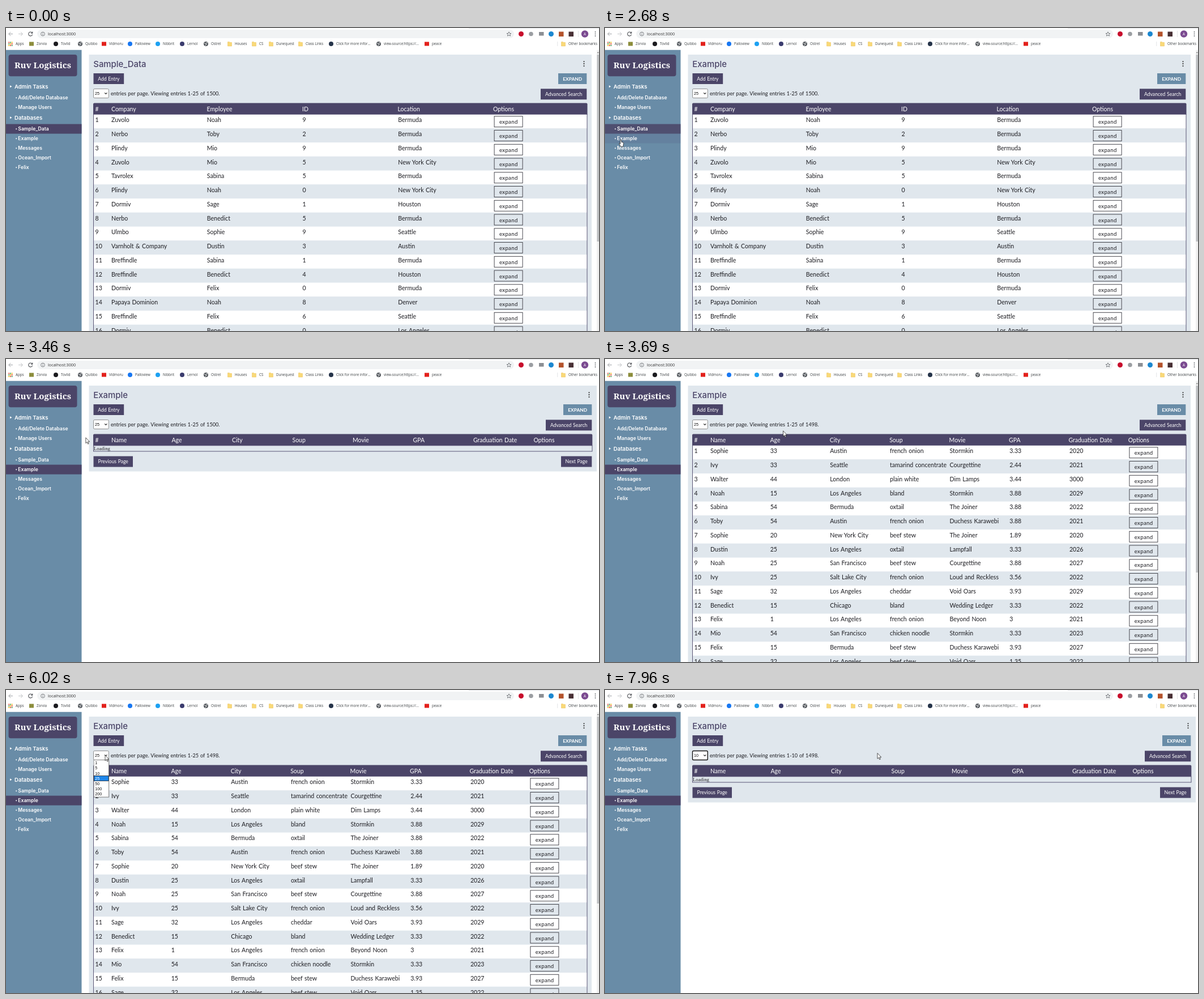
Animation, 1047 px wide and 535 px high, one loop 8 s. Source, as an HTML page:

```html
<!DOCTYPE html>
<html lang="en">
<head>
<meta charset="utf-8">
<title>Database dashboard</title>
<style>
html, body { margin: 0; width: 100%; height: 100%; overflow: hidden; background: #fff; }
svg { display: block; width: 100vw; height: 100vh; }
text { white-space: pre; }
.bar { font: 6.2px "Open Sans", sans-serif; fill: #3c4043; }
.url { font: 7.3px "Open Sans", sans-serif; fill: #333; }
.cell { font: 10.6px Lato, sans-serif; word-spacing: .7px; fill: #1d1d22; }
.head { font: 10.5px Lato, sans-serif; word-spacing: .7px; fill: #fff; }
.info { font: 9.13px Lato, sans-serif; word-spacing: .6px; fill: #1d1d22; }
.btn { font: 8.6px Lato, sans-serif; word-spacing: .5px; fill: #fff; text-anchor: middle; }
.wide { font: bold 8.4px Lato, sans-serif; fill: #fff; text-anchor: middle; }
.more { font: 9.7px Lato, sans-serif; letter-spacing: .3px; fill: #1d1d22; text-anchor: middle; }
.title { font: 500 14.9px Inter, sans-serif; fill: #4b4568; }
.group { font: 600 9.6px Inter, sans-serif; fill: #fff; }
.item { font: 600 8.6px Inter, sans-serif; fill: #fff; }
.brand { font: 600 15px "Noto Serif", serif; fill: #fff; text-anchor: middle; }
.opt { font: 7.2px "Liberation Sans", sans-serif; fill: #111; }
.wait { font: 8.7px "Liberation Serif", serif; fill: #1d1d22; }
</style>
</head>
<body>
<svg id="stage" viewBox="0 0 1047 535" preserveAspectRatio="none"></svg>
<script>
const PURPLE = '#4b4568', BLUE = '#698ca7', PANEL = '#e0e7ed';
const LOOP = 8000, TICK = 77.61, TICK_START = 39;
const ROW = 24.75;

const rect = (x, y, w, h, fill, more = '') =>
  `<rect x="${x}" y="${y}" width="${w}" height="${h}" fill="${fill}" ${more}/>`;
const circle = (x, y, r, fill, more = '') =>
  `<circle cx="${x}" cy="${y}" r="${r}" fill="${fill}" ${more}/>`;
const path = (d, stroke, width = 1, fill = 'none') =>
  `<path d="${d}" fill="${fill}" stroke="${stroke}" stroke-width="${width}"/>`;
const text = (cls, x, y, s, more = '') =>
  `<text class="${cls}" x="${x}" y="${y}" ${more}>${s.replace(/&/g, '&amp;')}</text>`;
const group = (id, body) => `<g id="${id}">${body}</g>`;
const button = (x, y, w, label) =>
  rect(x, y, w, 19, PURPLE) + text('btn', x + w / 2, y + 12.6, label);

const people = `Zuvolo|Noah|9|Bermuda
Nerbo|Toby|2|Bermuda
Plindy|Mio|9|Bermuda
Zuvolo|Mio|5|New York City
Tavrolex|Sabina|5|Bermuda
Plindy|Noah|0|New York City
Dormiv|Sage|1|Houston
Nerbo|Benedict|5|Bermuda
Ulmbo|Sophie|9|Seattle
Varnholt & Company|Dustin|3|Austin
Breffindle|Sabina|1|Bermuda
Breffindle|Benedict|4|Houston
Dormiv|Felix|0|Bermuda
Papaya Dominion|Noah|8|Denver
Breffindle|Felix|6|Seattle
Dormiv|Benedict|0|Los Angeles`;

const films = `Sophie|33|Austin|french onion|Stormkin|3.33|2020
Ivy|33|Seattle|tamarind concentrate|Courgettine|2.44|2021
Walter|44|London|plain white|Dim Lamps|3.44|3000
Noah|15|Los Angeles|bland|Stormkin|3.88|2029
Sabina|54|Bermuda|oxtail|The Joiner|3.88|2022
Toby|54|Austin|french onion|Duchess Karawebi|3.88|2021
Sophie|20|New York City|beef stew|The Joiner|1.89|2020
Dustin|25|Los Angeles|oxtail|Lampfall|3.33|2026
Noah|25|San Francisco|beef stew|Courgettine|3.88|2027
Ivy|25|Salt Lake City|french onion|Loud and Reckless|3.56|2022
Sage|32|Los Angeles|cheddar|Void Oars|3.93|2029
Benedict|15|Chicago|bland|Wedding Ledger|3.33|2022
Felix|1|Los Angeles|french onion|Beyond Noon|3|2021
Mio|54|San Francisco|chicken noodle|Stormkin|3.33|2023
Felix|15|Bermuda|beef stew|Duchess Karawebi|3.93|2027
Sage|32|Los Angeles|beef stew|Void Oars|1.35|2022`;

const peopleHead = 'Company|Employee|ID|Location|Options';
const filmHead = 'Name|Age|City|Soup|Movie|GPA|Graduation Date|Options';

function header(names, step, right) {
  return path(`M154 152.7V134.4Q154 132.4 156 132.4H${right - 2}Q${right} 132.4 ${right} 134.4V152.7Z`, 'none', 0, PURPLE)
    + text('head', 157.5, 146.6, '#')
    + names.split('|').map((s, i) => text('head', 186 + i * step, 146.6, s)).join('');
}

function table(names, step, rows) {
  const last = 186 + step * (names.split('|').length - 1) + 1.6;
  const body = rows.split('\n').map((line, i) => {
    const y = 152.6 + i * ROW, base = y + 13.7;
    return rect(154.5, y, 871.5, ROW, i % 2 ? PANEL : '#fff')
      + text('cell', 157.5, base, String(i + 1))
      + line.split('|').map((s, c) => text('cell', 186 + c * (step + .25), base, s)).join('')
      + rect(last + .5, y + 3.2, 50, 19, 'none', 'stroke="#35353c" stroke-width=".9"')
      + text('more', last + 25.7, y + 16.8, 'expand');
  }).join('');
  return body + path('M154.5 152V535M1026 152V535', PURPLE, .9) + header(names, step, 1026.5);
}

const globe = x => circle(x, 28, 4, '#50555a')
  + path(`M${x - 3} 26.5q2 2 3 .5t3 -1M${x - 1} 31q0 -2 3 -2.5`, '#fff');
const folder = x => path(`M${x - 3.5} 24.5h3l1 1h3v6.5h-7z`, '#e8bd55', .5, '#f9d978');
const disc = color => x => circle(x, 28, 4, color);
const square = color => x => rect(x - 4, 24.5, 8, 7, color);

function browser() {
  const marks = [
    [45, 'Zorvia', square('#8c8d3c')], [88, 'Tovlid', disc('#1b1b1f')], [131, 'Quibbo', globe],
    [173, 'Vidmoru', square('#e3211c')], [219, 'Palloview', disc('#1877f2')], [268, 'Nibbrit', disc('#1da1f2')],
    [311, 'Lernol', disc('#3b3c6e')], [353, 'Ostrel', globe], [395, 'Houses', folder], [438, 'CS', folder],
    [468, 'Dunequest', folder], [520, 'Class Links', folder], [574, 'Click for more infor...', disc('#26344a')],
    [658, 'view-source:https://...', globe], [743, 'peace', square('#e3211c')], [984, 'Other bookmarks', folder]
  ];
  const dots = ['#e34133', '#3c9d55', '#f2b40f'];
  let s = rect(0, 0, 1047, 38.5, '#fff') + rect(817, 0, 230, 1, '#e4e6e9')
    + rect(55, 3, 842, 15, '#f1f3f4', 'rx="7.5"')
    + path('M12 10.5H5M8.2 7L4.8 10.5L8.2 14', '#a2a5a9')
    + path('M22 10.5h7M26 7l3.4 3.5L26 14', '#c3c5c8')
    + path('M46.2 8.7A3.5 3.5 0 1 0 46.6 11.5M46.8 6.5V9.2H44', '#505357', 1.1)
    + circle(65, 10.5, 3.4, 'none', 'stroke="#5f6368" stroke-width=".8"')
    + path('M65 10v2.4M65 8.2v1', '#5f6368', .8)
    + text('url', 74, 13.2, 'localhost:3000')
    + path('M888 6.8l1.1 2.6 2.8.2-2.1 1.8.7 2.7-2.5-1.5-2.5 1.5.7-2.7-2.1-1.8 2.8-.2z', '#5f6368', .8)
    + circle(909.5, 10.5, 4.5, '#c70d2c') + circle(927, 10.5, 3.8, '#9b9ea2')
    + rect(941, 7, 8.5, 6.5, '#8c8f94') + circle(962.5, 10.5, 4.5, '#1b87d0')
    + rect(976, 6.5, 8.5, 8.5, '#b4532c') + rect(993.5, 6.5, 8.5, 8.5, '#483035')
    + rect(1010, 5, .7, 11, '#d5d7da') + circle(1022, 10.5, 6.2, '#7b4a90')
    + text('bar', 1022, 12.8, 'A', 'style="fill:#fff" text-anchor="middle"');
  for (let i = 0; i < 9; i++) {
    const row = Math.floor(i / 3);
    s += rect(4.3 + i % 3 * 2.7, 24.5 + row * 2.7, 1.9, 1.9, dots[(i + row) % 3]);
  }
  for (const y of [7, 10.5, 14]) s += circle(1040.5, y, .9, '#5f6368');
  s += text('bar', 17, 30.3, 'Apps') + rect(973.5, 24, .7, 8, '#d5d7da');
  return s + marks.map(([x, label, icon]) => icon(x) + text('bar', x + 9, 30.3, label)).join('');
}

const items = [['Sample_Data', 178], ['Example', 195], ['Messages', 212], ['Ocean_Import', 229], ['Felix', 246]];

function sidebar() {
  const entry = (s, y, id) => `<g id="${id}" class="item"><circle cx="18.2" cy="${y + .3}" r="1"/>`
    + `<text x="21.3" y="${y + 3.1}">${s}</text></g>`;
  const section = (s, y) => path(`M7 ${y - 2}L10.5 ${y}L7 ${y + 2}Z`, 'none', 0, '#fff') + text('group', 15, y + 3.5, s);
  return rect(0, 38.5, 133.5, 496.5, BLUE)
    + rect(4.5, 47, 121, 38.3, PURPLE, 'rx="4"') + text('brand', 65, 71.2, 'Ruv Logistics')
    + section('Admin Tasks', 103.3) + entry('Add/Delete Database', 123, 'add') + entry('Manage Users', 140, 'users')
    + section('Databases', 158.3)
    + rect(0, 169.6, 133.5, 17, PURPLE, 'id="rowA"') + rect(0, 186.6, 133.5, 17, PURPLE, 'id="rowB"')
    + items.map(([s, y], i) => entry(s, y, 'item' + i)).join('');
}

const sizes = ['1', '5', '10', '25', '50', '100', '200'];
const optionY = i => 124 + i * 9.2;

function dropdown() {
  return rect(155, 123.6, 27.4, 66.2, '#000', 'opacity=".2"')
    + rect(155, 123.6, 26.4, 65.4, '#fff', 'stroke="#6b6b6b" stroke-width=".7"')
    + rect(155.3, 0, 25.8, 9, '#1e86ea', 'id="pick" stroke="#111" stroke-width=".7"')
    + sizes.map((s, i) => text('opt', 157.3, optionY(i) + 7.1, s, `id="opt${i}"`)).join('');
}

document.getElementById('stage').innerHTML =
  rect(0, 0, 1047, 535, '#fff')
  + group('scroll', rect(1043, 38.5, 4, 496.5, '#f1f1f1') + rect(1043.4, 47, 3.6, 330, '#bfc1c3')
    + path('M1043.7 44.2L1045.2 42L1046.7 44.2Z', 'none', 0, '#777'))
  + rect(146.5, 47, 887.5, 488, PANEL, 'id="panel"')
  + text('title', 154.3, 68.6, '', 'id="title"')
  + button(154.5, 80, 53.7, 'Add Entry')
  + text('info', 185, 118.6, '', 'id="info"')
  + rect(154.5, 107.5, 26.8, 16, '#fff', 'id="select" rx="1.8"')
  + text('opt', 157, 118.2, '', 'id="size"') + path('M174.2 114.3l2.1 2.1l2.1 -2.1', '#222', 1.1)
  + group('right', [59.3, 63.2, 67.1].map(y => circle(1020.5, y, 1.1, '#333')).join('')
    + rect(975, 80, 50.3, 19, BLUE, 'id="wide"') + text('wide', 1000.2, 92.6, 'EXPAND', 'id="wideText"')
    + button(944, 107.3, 81.3, 'Advanced Search'))
  + group('people', table(peopleHead, 168.5, people))
  + group('films', table(filmHead, 105.4, films))
  + group('load', header(filmHead, 106.5, 1035.3)
    + rect(154.5, 152.8, 880.5, 10.2, 'none', `stroke="${PURPLE}" stroke-width=".9"`)
    + text('wait', 155, 160.7, 'Loading')
    + button(154.5, 171.6, 69.5, 'Previous Page') + button(980, 171.6, 54.3, 'Next Page'))
  + sidebar() + browser()
  + group('drop', dropdown())
  + circle(0, 0, 7, '#ff0', 'id="spot" opacity=".65"')
  + group('arrow', path('M0 0V9.8L2.2 7.8L3.8 11.3L5.3 10.6L3.8 7.2H6.8Z', '#111', .7, '#fff'))
  + group('hand', path('M-1 .8Q0 -.4 1 .8V4.4L3.9 5Q5 5.4 4.8 7.4L4 10.8V12.6H-.8V11L-3 7.8Q-3.4 6.3 -2.2 6.6L-1 7.8Z', '#111', .7, '#fff'));

const el = {};
document.querySelectorAll('[id]').forEach(n => el[n.id] = n);
const show = (n, on) => n.style.display = on ? '' : 'none';
const set = (n, attrs) => { for (const k in attrs) n.setAttribute(k, attrs[k]); };
const label = (n, s) => { if (n.textContent !== s) n.textContent = s; };

const ease = {
  both: u => u * u * (3 - 2 * u),
  out: u => 1 - (1 - u) ** 2,
  flat: u => u
};
// time, x, y, easing towards this point
const trail = [
  [280, 791, 514, 'flat'], [1060, 26, 228, 'out'], [1130, 25, 217, 'flat'], [1600, 31, 165, 'both'],
  [1900, 27, 181, 'both'], [2290, 28, 197, 'both'], [3150, 28, 197, 'flat'], [3460, 139, 139, 'flat'],
  [3920, 370, 123, 'out'], [3960, 370, 123, 'flat'], [4600, 1000, 76, 'both'], [4780, 1011, 80, 'both'],
  [4860, 1010, 82, 'flat'], [4930, 1009, 89, 'flat'], [5030, 1009, 89, 'flat'], [5870, 182, 114, 'both'],
  [5940, 175, 115, 'flat'], [6180, 175, 115, 'flat'], [6630, 163, 150, 'both'], [7510, 163, 150, 'flat'],
  [7960, 481, 111.5, 'out']
];

function pointer(t) {
  const i = trail.findIndex(k => k[0] > t);
  if (i < 0) return trail[trail.length - 1].slice(1, 3);
  if (!i) return trail[0].slice(1, 3);
  const a = trail[i - 1], b = trail[i];
  const u = ease[b[3]]((t - a[0]) / (b[0] - a[0]));
  return [a[1] + (b[1] - a[1]) * u, a[2] + (b[2] - a[2]) * u];
}

function draw(time) {
  // the screen refreshes in even ticks
  const t = TICK_START + Math.floor((time - TICK_START) / TICK) * TICK + 8;
  const within = (a, b) => t >= a && t < b;
  const [x, y] = pointer(t);

  const ten = t >= 7335, example = t >= 2670, loaded = t >= 3690;
  const loading = within(2745, 3690) || ten;
  show(el.people, t < 2745);
  show(el.films, loaded && !loading);
  show(el.load, loading);
  show(el.scroll, !loading);
  set(el.panel, { width: loading ? 896.5 : 887.5, height: loading ? 151.5 : 488 });
  set(el.right, { transform: `translate(${loading ? 9 : 0})` });

  label(el.title, example ? 'Example' : 'Sample_Data');
  label(el.info, `entries per page. Viewing entries 1-${ten ? 10 : 25} of ${loaded ? 1498 : 1500}.`);
  label(el.size, ten ? '10' : '25');
  set(el.select, { stroke: ten ? '#151515' : '#767676', 'stroke-width': ten ? 1.4 : .8 });

  const swap = t < 2670 ? 0 : t < 2745 ? .14 : 1;
  set(el.rowA, { opacity: 1 - swap });
  set(el.rowB, { opacity: swap });

  let hover = -1;
  if (within(980, 1195)) hover = 3;
  else if (within(1195, 1350)) hover = 2;
  else if (within(1350, 1430) || within(1975, 2580)) hover = 1;
  items.forEach((_, i) => el['item' + i].style.fill = i === hover ? '#4e5176' : '');

  const over = within(4850, 5150);
  set(el.wide, { x: over ? 973 : 975, width: over ? 52.3 : 50.3 });
  set(el.wideText, { x: over ? 999.2 : 1000.2 });
  el.wideText.style.fontSize = over ? '8.85px' : '';

  show(el.drop, within(6010, 7335));
  const pick = y < 124 ? 3 : Math.min(6, Math.floor((y - 124) / 9.2));
  set(el.pick, { y: optionY(pick) });
  sizes.forEach((_, i) => el['opt' + i].style.fill = i === pick ? '#fff' : '');

  show(el.spot, within(2580, 2670) || within(5930, 6010) || within(7170, 7335));
  set(el.spot, { cx: x, cy: y });

  const hand = x < 133 && y > 112 && y < 256;
  show(el.arrow, t >= 275 && !hand);
  show(el.hand, t >= 275 && hand);
  set(hand ? el.hand : el.arrow, { transform: `translate(${x.toFixed(2)} ${y.toFixed(2)})` });
}

let start;
function loop(now) {
  start ??= now;
  draw((now - start) % LOOP);
  requestAnimationFrame(loop);
}
draw(0);
requestAnimationFrame(loop);
</script>
</body>
</html>
```
